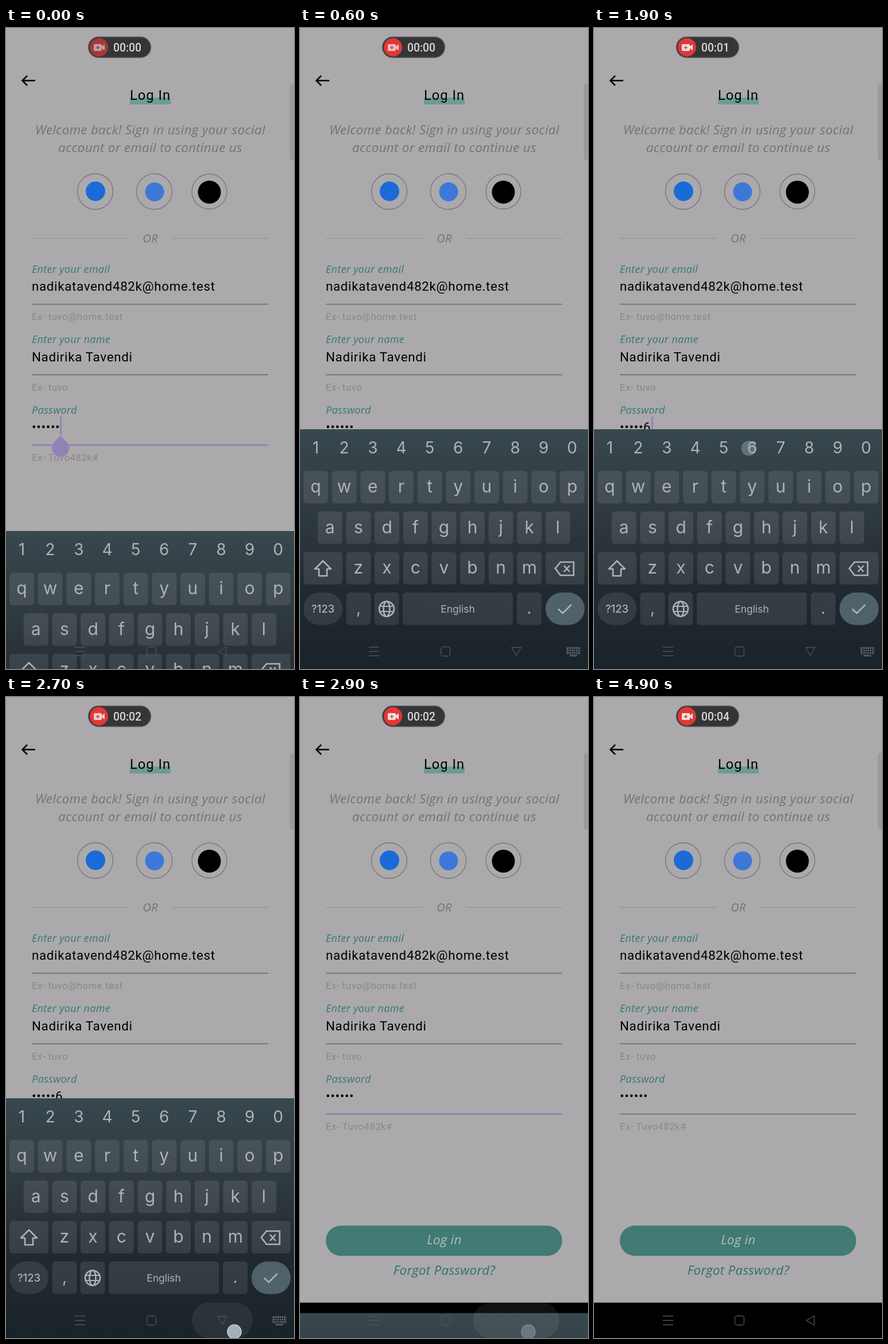
These frames come from a looping animation (502 px wide and 1115 px high, 5.3 s). An HTML page:

```html
<!DOCTYPE html>
<html lang="en">
<head>
<meta charset="utf-8">
<title>Log in screen</title>
<style>
  html, body { margin: 0; width: 100%; height: 100%; overflow: hidden; background: #aba9ab; }
  svg { display: block; width: 100%; height: 100%; }
  text { font-family: Roboto, sans-serif; white-space: pre; }
  .mid { text-anchor: middle; }
  .soft { font: italic 22.3px "Open Sans", "Noto Sans", sans-serif; letter-spacing: .35px; fill: #747275; }
  .label { font: italic 18px "Open Sans", "Noto Sans", sans-serif; letter-spacing: .35px; fill: #357a6d; }
  .value { font-size: 22.3px; letter-spacing: .7px; }
  .hint { font-size: 16.7px; letter-spacing: .56px; fill: #89878a; }
  .key { font-family: Inter, Roboto, sans-serif; fill: #adb3b6; text-anchor: middle; }
  .line { fill: none; stroke: #adb3b6; stroke-width: 2.6; }
  .nav { fill: none; stroke: #4e5457; stroke-width: 1.3; }
</style>
</head>
<body>
<svg viewBox="0 0 502 1115" preserveAspectRatio="none">
  <defs>
    <linearGradient id="board" x1="0" y1="0" x2="0" y2="1">
      <stop offset="0" stop-color="#38484e"/>
      <stop offset=".35" stop-color="#2f3a40"/>
      <stop offset=".65" stop-color="#222a31"/>
      <stop offset="1" stop-color="#19232a"/>
    </linearGradient>
    <clipPath id="buttonClip"><rect x="45" y="919.500" width="412" height="52.500" rx="26"/></clipPath>
  </defs>

  <rect width="502" height="1115" fill="#aba9ab"/>
  <rect x="494.500" y="97" width="16" height="134" rx="6" fill="#9a999b"/>

  <rect x="143.500" y="15.500" width="109" height="36" rx="18" fill="#353537" stroke="#626163" stroke-width="1.300"/>
  <g id="recorder">
    <circle cx="162" cy="33.500" r="16" fill="#e03836"/>
    <g id="camera">
      <path d="M155 28h10q2 0 2 2v2l5-3.500v10.500l-5-3.500v2.500q0 2-2 2h-10q-2 0-2-2v-8q0-2 2-2z" fill="#f0dede"/>
      <path d="M157 34h6M160 31v6" stroke="#e03836" stroke-width="1.500"/>
    </g>
  </g>
  <text id="timer" x="187" y="41" font-size="19.300" font-weight="500" fill="#d9d8d9"></text>

  <path d="M51 91.500H29.500M37 83l-8.500 8.500L37 100" fill="none" stroke="#000" stroke-width="2.600"/>
  <rect x="216" y="121" width="71" height="12" fill="#6c9c93"/>
  <text class="mid" x="251.500" y="125" font-size="23.700" letter-spacing="1">Log In</text>
  <text class="soft mid" x="251.500" y="185">Welcome back! Sign in using your social</text>
  <text class="soft mid" x="251.500" y="216">account or email to continue us</text>

  <g fill="none" stroke="#777578" stroke-width="1.300">
    <circle cx="155.500" cy="284.500" r="31"/>
    <circle cx="258.500" cy="284.500" r="31"/>
    <circle cx="354.500" cy="284.500" r="30.500"/>
  </g>
  <circle cx="156" cy="284" r="17" fill="#1a6bd8"/>
  <circle cx="259" cy="285" r="16.500" fill="#3d78d8"/>
  <circle cx="354.500" cy="285.500" r="20"/>

  <path d="M45 366H213M290 366H457" stroke="#8e8d8f"/>
  <text class="soft mid" x="251.500" y="373" style="font-size:20px">OR</text>
  <g id="fields"></g>
  <path id="focusLine" d="M45 725.500H457"/>
  <path id="cursor" d="M0 676V708" stroke="#9183b6" stroke-width="2.800"/>
  <path id="handle" d="M95 709.300L105.600 720A15 15 0 1 1 84.400 720Z" fill="#9081b5" fill-opacity=".94"/>

  <rect x="45" y="919.500" width="412" height="52.500" rx="26" fill="#427a74"/>
  <circle id="splash" cx="275" cy="943" fill="#fff" clip-path="url(#buttonClip)"/>
  <text class="soft mid" x="251.500" y="952" style="fill:#b0bfbd">Log in</text>
  <text class="soft mid" x="251.500" y="1005" style="fill:#30746a">Forgot Password?</text>

  <rect y="1053.500" width="502" height="62"/>
  <g id="keyboard">
    <rect y="698" width="502" height="417" fill="url(#board)"/>
    <g id="keys"></g>
  </g>
  <rect id="navRipple" y="1053.500" height="61.500" rx="30" fill="#fff"/>
  <g class="nav">
    <path d="M120 1077H138M120 1084.500H138M120 1092H138"/>
    <rect x="245.500" y="1076.500" width="16" height="16" rx="4"/>
    <path id="back" d="M369 1077.500H385L377 1091.500Z"/>
    <g id="switcher" stroke="#788086">
      <path d="M466 1079.500H487M466 1083H487M466 1086.500H487" stroke-width="2" stroke-dasharray="2 1.700"/>
      <path d="M465 1077.500H488V1089H465Z" stroke-width=".7"/>
      <path d="M470 1092H483" stroke-width="1.500"/>
    </g>
  </g>
  <circle id="touch" r="12" fill="#a0b1bc" stroke="#cbd8df" stroke-width="1.500"/>
</svg>
<script>
const $ = id => document.getElementById(id);
const set = (id, attrs) => {
  for (const name in attrs) $(id).setAttribute(name, attrs[name]);
};
const clamp = v => Math.min(1, Math.max(0, v));
const ramp = (t, start, length) => clamp((t - start) / length);
const smooth = p => p * p * (3 - 2 * p);

// Form fields
const fields = [
  ['Enter your email', 'nadikatavend482k@home.test', 'Ex- tuvo@home.test'],
  ['Enter your name', 'Nadirika Tavendi', 'Ex- tuvo'],
  ['Password', '', 'Ex- Tuvo482k#']
];
$('fields').innerHTML = fields.map(([label, value, hint], i) => {
  const y = 122.7 * i;
  const line = i < 2 ? `<path d="M45 ${480.5 + y}H457" stroke="#6a696b" stroke-width="1.5"/>` : '';
  return `<text class="label" x="45" y="${425.5 + y}">${label}</text>
    <text class="value" id="value${i}" x="45" y="${456.8 + y}">${value}</text>${line}
    <text class="hint" x="45" y="${508 + y}">${hint}</text>`;
}).join('');

// Keyboard
const pitch = 49.65;
const keyBox = (x, y, width = 43, rx = 6, fill = '#fff', alpha = .095) =>
  `<rect x="${x}" y="${y}" width="${width}" height="56.500" rx="${rx}" fill="${fill}" fill-opacity="${alpha}"/>`;
const keyText = (x, y, label, size = 30, weight = 400) =>
  `<text class="key" x="${x}" y="${y}" font-size="${size}" font-weight="${weight}">${label}</text>`;
const keyRow = (letters, x, y) => [...letters].map((letter, i) =>
  keyBox(x + pitch * i - 21.5, y) + keyText(x + pitch * i, y + 37.5, letter)).join('');

$('keys').innerHTML =
  [...'1234567890'].map((digit, i) => keyText(27.5 + pitch * i, 740, digit, 28)).join('') +
  keyRow('qwertyuiop', 27.5, 770.5) +
  keyRow('asdfghjkl', 52.3, 841) +
  keyRow('zxcvbnm', 101.9, 911.5) +
  keyBox(6, 911.5, 68) + keyBox(428, 911.5, 68) +
  keyBox(6, 982, 68, 28) + keyText(40, 1017, '?123', 18.5, 500) +
  keyBox(80.5, 982) + keyText(102, 1019, ',', 28) +
  keyBox(129.5, 982) +
  keyBox(179, 982, 192) + keyText(275, 1017, 'English', 17.5) +
  keyBox(378, 982) + keyText(399.5, 1019, '.', 28) +
  keyBox(428, 982, 68, 28, '#4f626c', 1) +
  `<g class="line">
    <path d="M40 927L54 941H47V953H33V941H26Z" stroke-linejoin="round"/>
    <path d="M445 940L454 929H477V952H454ZM460 935l10 11M470 935l-10 11"/>
    <circle cx="151" cy="1010.500" r="13"/>
    <ellipse cx="151" cy="1010.500" rx="5.500" ry="13"/>
    <path d="M139 1006H163M139 1015H163" stroke-width="2"/>
    <path d="M450 1010.500L458 1018L473 1003"/>
  </g>`;

// Each tap: start, time held, x, y
const taps = [
  [700, 100, 455, 942],
  [1700, 100, 270, 731],
  [2600, 200, 398, 1104],
  [4000, 150, 275, 943]
];
const during = (t, from, to) => t >= from && t < to;

function password(t) {
  if (during(t, 800, 1800)) return '•••••';
  if (during(t, 1800, 2800)) return '•••••6';
  return '••••••';
}

function draw(t) {
  // Recorder pill
  set('recorder', { opacity: .68 + .32 * ramp(t, 0, 200) });
  set('camera', { opacity: .86 + .14 * Math.cos((t - 900) / 500 * Math.PI) });
  $('timer').textContent = '00:0' + Math.max(0, Math.floor((t - 200) / 1000));

  // Password field
  $('value2').textContent = password(t);
  const cursorX = t < 800 ? 95.5 : t < 1800 ? 87.3 : 101.5;
  const cursorOn = t < 300 || during(t, 800, 1300) || during(t, 1800, 2300);
  set('cursor', { transform: `translate(${cursorX})`, opacity: +cursorOn });
  set('handle', { opacity: +(t < 800) });
  const focused = t < 3600;
  set('focusLine', { stroke: focused ? '#8d80b4' : '#6a696b', 'stroke-width': focused ? 2.5 : 1.5 });

  // Keyboard slides in, then leaves as an empty panel
  const entering = 177 * (1 - ramp(t, 0, 400)) ** 2.5;
  const leaving = 417 * smooth(ramp(t, 2700, 250));
  set('keyboard', { transform: `translate(0 ${entering + leaving})` });
  set('keys', { opacity: +(t < 2800) });
  const turn = t < 1000 ? 1 - smooth(ramp(t, 0, 300)) : ramp(t, 2700, 100);
  set('back', { transform: `rotate(${90 * turn} 377 1084.5)` });
  set('switcher', { opacity: +during(t, 300, 2800) });

  // Tap feedback
  const rippleWidth = 84 + 66 * ramp(t, 2600, 300);
  const rippleAlpha = t < 2600 ? 0 : .065 * (1 - ramp(t, 2900, 200));
  set('navRipple', { x: 377 - rippleWidth / 2, width: rippleWidth, opacity: rippleAlpha });
  const splash = ramp(t, 4100, 500);
  set('splash', { r: 240 * splash, opacity: .09 * (1 - splash) });

  const tap = taps.findLast(([start]) => t >= start);
  if (tap) {
    const [start, held, x, y] = tap;
    set('touch', { cx: x, cy: y, opacity: 1 - ramp(t, start + held, 170) });
  } else {
    set('touch', { opacity: 0 });
  }
}

// The picture advances ten times a second and rests on its last step.
function tick() {
  const t = performance.now() % 5300;
  draw(Math.min(4900, Math.floor(t / 100) * 100));
  requestAnimationFrame(tick);
}
tick();
</script>
</body>
</html>
```
